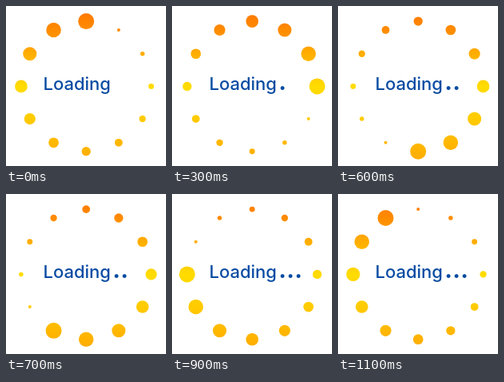
These frames come from a looping animation (200 px wide and 200 px high, 1200 ms). An HTML page:

```html
<!DOCTYPE html>
<html lang="en">
<head>
<meta charset="utf-8">
<title>Loading</title>
<style>
  html, body { margin: 0; width: 100%; height: 100%; overflow: hidden; background: #fff; }
  svg { display: block; width: 100%; height: 100%; }
  text { fill: #0a4ca3; }
  .label { font: 500 22px Inter, sans-serif; }
  .dots { font: 900 28px Lato, sans-serif; text-anchor: middle; }
</style>
</head>
<body>
<svg viewBox="0 0 200 200">
  <defs>
    <linearGradient id="sun" gradientUnits="userSpaceOnUse" x1="0" y1="9" x2="0" y2="192">
      <stop offset="0" stop-color="#ff7a00"/>
      <stop offset=".12" stop-color="#ff8c00"/>
      <stop offset=".28" stop-color="#ffae00"/>
      <stop offset=".5" stop-color="#ffdc00"/>
      <stop offset=".72" stop-color="#ffcb00"/>
      <stop offset=".88" stop-color="#ffb800"/>
      <stop offset="1" stop-color="#ffac00"/>
    </linearGradient>
  </defs>
  <g id="ring" fill="url(#sun)"></g>
  <text class="label" x="46.5" y="105">Loading</text>
  <text class="dots" id="dots" x="138 148 158" y="105"></text>
</svg>
<script>
  const COUNT = 12, STEP = 100, LOOP = COUNT * STEP;
  const CENTER = { x: 100.2, y: 100.4 }, RING_RADIUS = 81.3;
  const MAX_R = 10, MIN_R = 2;

  const ring = document.getElementById('ring');
  const dots = document.getElementById('dots');

  const balls = Array.from({ length: COUNT }, (_, i) => {
    const angle = i / COUNT * 2 * Math.PI;
    const ball = document.createElementNS('http://www.w3.org/2000/svg', 'circle');
    ball.setAttribute('cx', CENTER.x + RING_RADIUS * Math.sin(angle));
    ball.setAttribute('cy', CENTER.y - RING_RADIUS * Math.cos(angle));
    return ring.appendChild(ball);
  });

  function draw(time) {
    const step = Math.floor(time % LOOP / STEP);
    const head = step === 1 ? 0 : step; // the first pose is held twice as long
    balls.forEach((ball, i) => {
      const age = (head - i + COUNT) % COUNT;
      ball.setAttribute('r', MAX_R - (MAX_R - MIN_R) * age / (COUNT - 1));
    });
    dots.textContent = '.'.repeat(Math.floor(step / 3));
  }

  const start = performance.now();
  function tick(now) {
    draw(Math.max(0, now - start));
    requestAnimationFrame(tick);
  }
  draw(0);
  requestAnimationFrame(tick);
</script>
</body>
</html>
```
